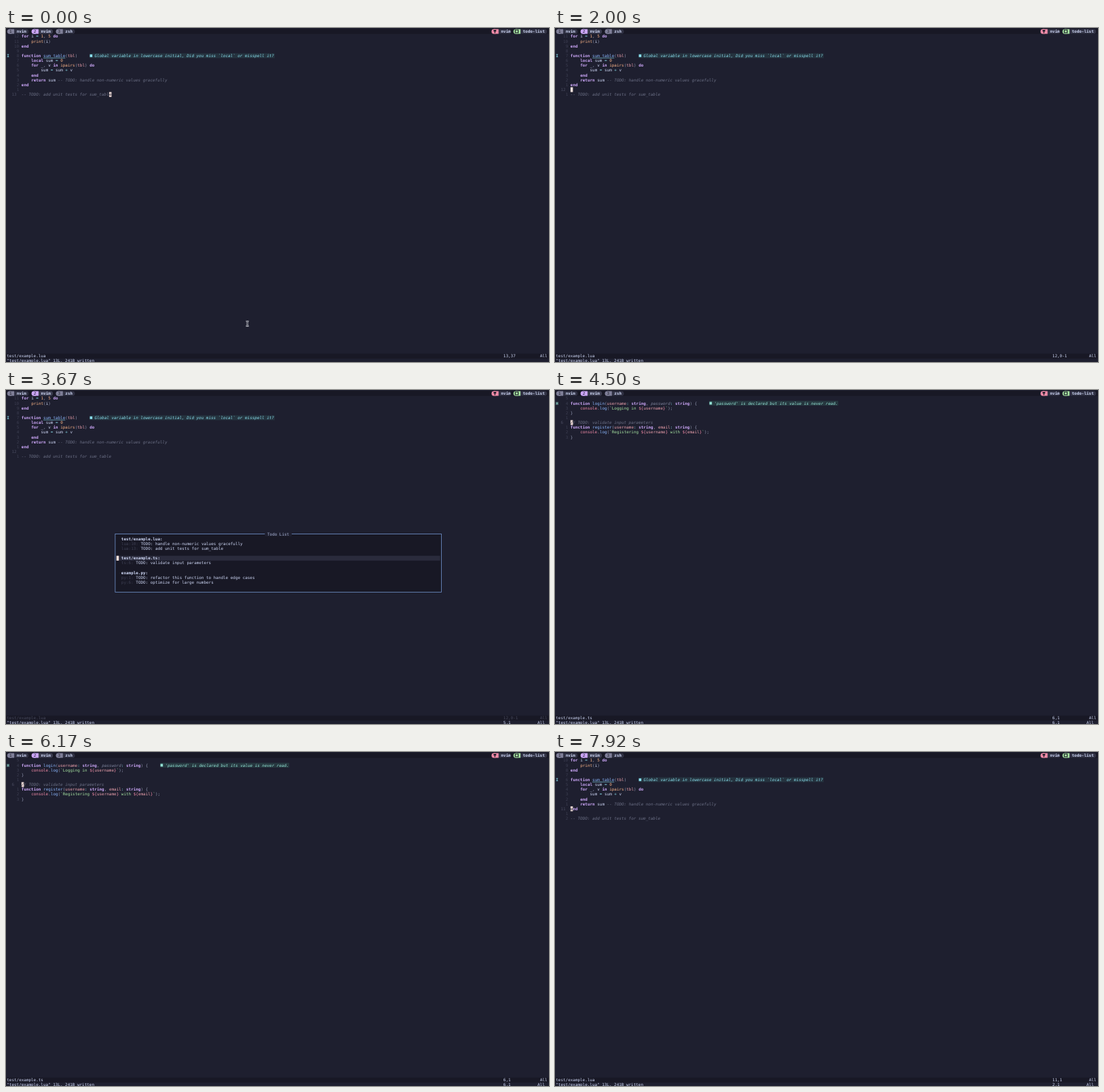
An HTML page that plays this animation: 800 px wide and 493 px high, repeating every 8000 ms.

```html
<!DOCTYPE html>
<html lang="en">
<head>
<meta charset="utf-8">
<style>
  html, body { margin: 0; width: 100%; height: 100%; overflow: hidden; background: #1e1f2f; }
  svg { display: block; width: 100vw; height: 100vh; }
  text {
    font: 500 5.957px "DejaVu Sans Mono", "Liberation Mono", monospace;
    white-space: pre; text-rendering: geometricPrecision;
  }
  .bold { font-weight: 700; }
  .italic { font-style: italic; }
</style>
</head>
<body>
<svg id="stage" viewBox="0 0 800 493"></svg>
<script>
const LOOP = 8000;
const CELL = 3.586, LINE = 7.15, LEFT = 1.3, TOP = 1.6;
const CODE = 6;
const BG = '#1e1f2f', MANTLE = '#181825', SURFACE = '#313244', DIM = '#3d3f52', CURSOR = '#f5e0dc';

// Each code segment starts with one of these keys.
const INK = {
  t: '#cdd6f4', m: '#cba6f7', b: '#89b4fa', g: '#a6e3a1', r: '#f38ba8', a: '#eba0ac',
  p: '#fab387', s: '#89dceb', c: '#6c7086', o: '#9399b2', u: '#89b4fa', i: '#7f849c'
};

const FILES = {
  lua: {
    name: 'test/example.lua',
    lines: [
      'mfor§t i §s=§p 1§o,§p 5§m do',
      'p    print§o(§ti§o)',
      'mend',
      '',
      'mfunction §usum_table§o(§atbl§o)',
      'm    local§t sum §s=§p 0',
      'm    for§t _§o,§t v §min§p ipairs§o(§atbl§o)§m do',
      't        sum §s=§t sum §s+§t v',
      'm    end',
      'm    return§t sum §c-- TODO: handle non-numeric values gracefully',
      'mend',
      '',
      'c-- TODO: add unit tests for sum_table'
    ],
    hint: { line: 5, col: 28, sign: 'I', ink: '#89dceb', back: '#25333f',
      text: 'Global variable in lowercase initial, Did you miss `local` or misspell it?' }
  },
  ts: {
    name: 'test/example.ts',
    lines: [
      '',
      'mfunction §blogin§o(§ausername§s: §mstring§o, §ipassword§s: §mstring§o) {',
      'r    console§o.§blog§o(§g`Logging in §r${§ausername§r}§g`§o);',
      'o}',
      '',
      'c// TODO: validate input parameters',
      'mfunction §bregister§o(§ausername§s: §mstring§o, §aemail§s: §mstring§o) {',
      'r    console§o.§blog§o(§g`Registering §r${§ausername§r}§g with §r${§aemail§r}§g`§o);',
      'o}'
    ],
    hint: { line: 2, col: 57, sign: 'H', ink: '#94e2d5', back: '#26373f',
      text: "'password' is declared but its value is never read." }
  }
};

const TODOS = [
  ['', 'test/example.lua:'],
  ['lua:10: ', 'TODO: handle non-numeric values gracefully'],
  ['lua:13: ', 'TODO: add unit tests for sum_table'],
  ['', ''],
  ['', 'test/example.ts:'],
  ['ts:6: ', 'TODO: validate input parameters'],
  ['', ''],
  ['', 'example.py:'],
  ['py:1: ', 'TODO: refactor this function to handle edge cases'],
  ['py:6: ', 'TODO: optimize for large numbers']
];

// Every step keeps the values of the one before, except those it names.
const STEPS = [
  { at: 0, file: 'lua', line: 13, col: 37, pos: '13,37', pick: 0, ruler: '', mouse: true },
  { at: 1000, line: 12, col: 1, pos: '12,0-1', mouse: false },
  { at: 2080, pick: 1, ruler: '1,1' },
  { at: 3000, pick: 2, ruler: '2,1' },
  { at: 3055, pick: 3, ruler: '3,1' },
  { at: 3110, pick: 4, ruler: '4,0-1' },
  { at: 3165, pick: 5, ruler: '5,1' },
  { at: 3745, pick: 6, ruler: '6,1' },
  { at: 4245, file: 'ts', line: 6, pos: '6,1', pick: 0 },
  { at: 6420, pick: 1, ruler: '1,1' },
  { at: 6830, pick: 2, ruler: '2,1' },
  { at: 7165, file: 'lua', line: 10, pos: '10,1', pick: 0 },
  { at: 7575, line: 11, pos: '11,1' }
];
STEPS.forEach((step, n) => { STEPS[n] = { ...STEPS[n - 1], ...step }; });

const x = col => LEFT + col * CELL;
const y = row => TOP + row * LINE;
const escape = s => s.replace(/&/g, '&amp;').replace(/</g, '&lt;');

const rect = (left, top, w, h, fill, extra = '') =>
  `<rect x="${left}" y="${top}" width="${w}" height="${h}" fill="${fill}" ${extra}/>`;
const cells = (col, row, n, fill) => rect(x(col), y(row), n * CELL, LINE, fill);

function print(col, row, str, fill, style = '') {
  const body = str.trimStart();
  const start = col + str.length - body.length;
  return body && `<text x="${x(start)}" y="${y(row) + 5.6}" fill="${fill}" class="${style}">${escape(body)}</text>`;
}

function codeLine(row, source) {
  let col = CODE, out = '';
  for (const part of source ? source.split('§') : []) {
    const key = part[0], str = part.slice(1);
    const style = 'ci'.includes(key) ? 'italic' : key === 'm' ? 'bold' : '';
    out += print(col, row, str, INK[key], style);
    if (key === 'u') out += rect(x(col), y(row) + 6.5, str.length * CELL, 0.6, INK.s);
    col += str.length;
  }
  return out;
}

// A rounded tab: coloured cap of three cells, then its label.
function tab(col, label, fill, labelBack, mark, last = true) {
  const top = y(0) + 0.1, h = LINE - 0.3, end = col + 4 + label.length;
  return rect(x(col) + 0.5, top, (end - col + (last ? 1 : 0)) * CELL - 0.8, h, labelBack, `rx="${last ? 3.4 : 0}"`) +
    rect(x(col) + 0.5, top, 8, h, fill, 'rx="3.4"') +
    rect(x(col + 1), top, 2 * CELL, h, fill) +
    mark + print(col + 4, 0, label, INK.t, 'bold');
}

function tabLine() {
  const number = (col, n) => print(col + 1, 0, n, MANTLE);
  const pin = rect(718.4, 2.9, 3.8, 2.2, MANTLE) + rect(719.7, 4.8, 1.2, 3, MANTLE);
  const pane = rect(750.3, 3, 4.4, 4, 'none', `stroke="${MANTLE}" stroke-width="1.1"`);
  return rect(0, y(0) - 0.6, 800, LINE + 0.6, MANTLE) +
    tab(0, 'nvim', '#7f7f98', SURFACE, number(0, '1')) +
    tab(10, 'nvim', INK.m, '#3c3d50', number(10, '2')) +
    tab(20, 'zsh', '#7f7f98', SURFACE, number(20, '3')) +
    tab(199, 'nvim', INK.r, SURFACE, pin, false) +
    tab(208, 'todo-list', INK.g, SURFACE, pane);
}

function block(col, row, char = '') {
  return cells(col, row, 1, CURSOR) + print(col, row, char, BG);
}

function editor({ file, line, col, pick }) {
  const { lines, hint } = FILES[file];
  let out = '';
  lines.forEach((source, n) => {
    const row = n + 1, gap = String(Math.abs(row - line));
    out += row === line ? print(2, row, String(line), '#494b60') : print(5 - gap.length, row, gap, DIM);
    out += codeLine(row, source);
  });
  const start = CODE + hint.col;
  out += print(0, hint.line, hint.sign, hint.ink, 'bold') +
    cells(start, hint.line, hint.text.length + 2, hint.back) +
    rect(x(start) + 0.3, y(hint.line) + 1.6, 3.7, 4, hint.ink) +
    print(start + 2, hint.line, hint.text, hint.ink, 'italic');
  if (!pick) {
    const plain = lines[line - 1].split('§').map(part => part.slice(1)).join('');
    out += block(CODE + col - 1, line, plain[col - 1]);
  }
  return out;
}

function todoList(pick) {
  if (!pick) return '';
  const left = x(44.5), top = y(29.5);
  let out = rect(left, top, 134 * CELL, 12 * LINE, MANTLE, `stroke="${INK.b}" stroke-width="0.8" stroke-opacity="0.8"`) +
    cells(106, 29, 11, BG) + print(107, 29, 'Todo List', '#a9b3d6') +
    cells(45, 29 + pick, 133, '#2a2b3c') + block(45, 29 + pick);
  TODOS.forEach(([place, label], n) => {
    out += print(47, 30 + n, place, DIM) + print(47 + place.length, 30 + n, label, INK.t, place ? '' : 'bold');
  });
  return out;
}

function footer({ file, pos, pick, ruler }) {
  const ink = pick ? '#45475a' : INK.t;
  return rect(0, y(67), 800, LINE, MANTLE) +
    print(0, 67, FILES[file].name, ink) + print(204, 67, pos, ink) + print(219, 67, 'All', ink) +
    print(0, 68, '"test/example.lua" 13L, 241B written', INK.t) +
    (ruler && print(204, 68, ruler, INK.t) + print(218, 68, 'All', INK.t));
}

function pointer() {
  const shape = 'M353.6 432.6 Q355.6 432.6 355.6 434 Q355.6 432.6 357.6 432.6 M355.6 434 V438.6 ' +
    'M353.6 440 Q355.6 440 355.6 438.6 Q355.6 440 357.6 440 M354.4 436.3 H356.8';
  const stroke = (color, w) => `<path d="${shape}" fill="none" stroke="${color}" stroke-width="${w}"/>`;
  return stroke('#e4e6f0', 1.9) + stroke('#15151f', 0.7);
}

const stage = document.getElementById('stage');
let shown;

function render(time) {
  const step = STEPS.findLast(s => s.at <= time % LOOP);
  if (step !== shown) {
    shown = step;
    stage.innerHTML = rect(0, 0, 800, 493, BG) + tabLine() + editor(step) +
      todoList(step.pick) + footer(step) + (step.mouse ? pointer() : '');
  }
}

const began = performance.now();
function tick() {
  render(performance.now() - began);
  requestAnimationFrame(tick);
}
tick();
</script>
</body>
</html>
```
